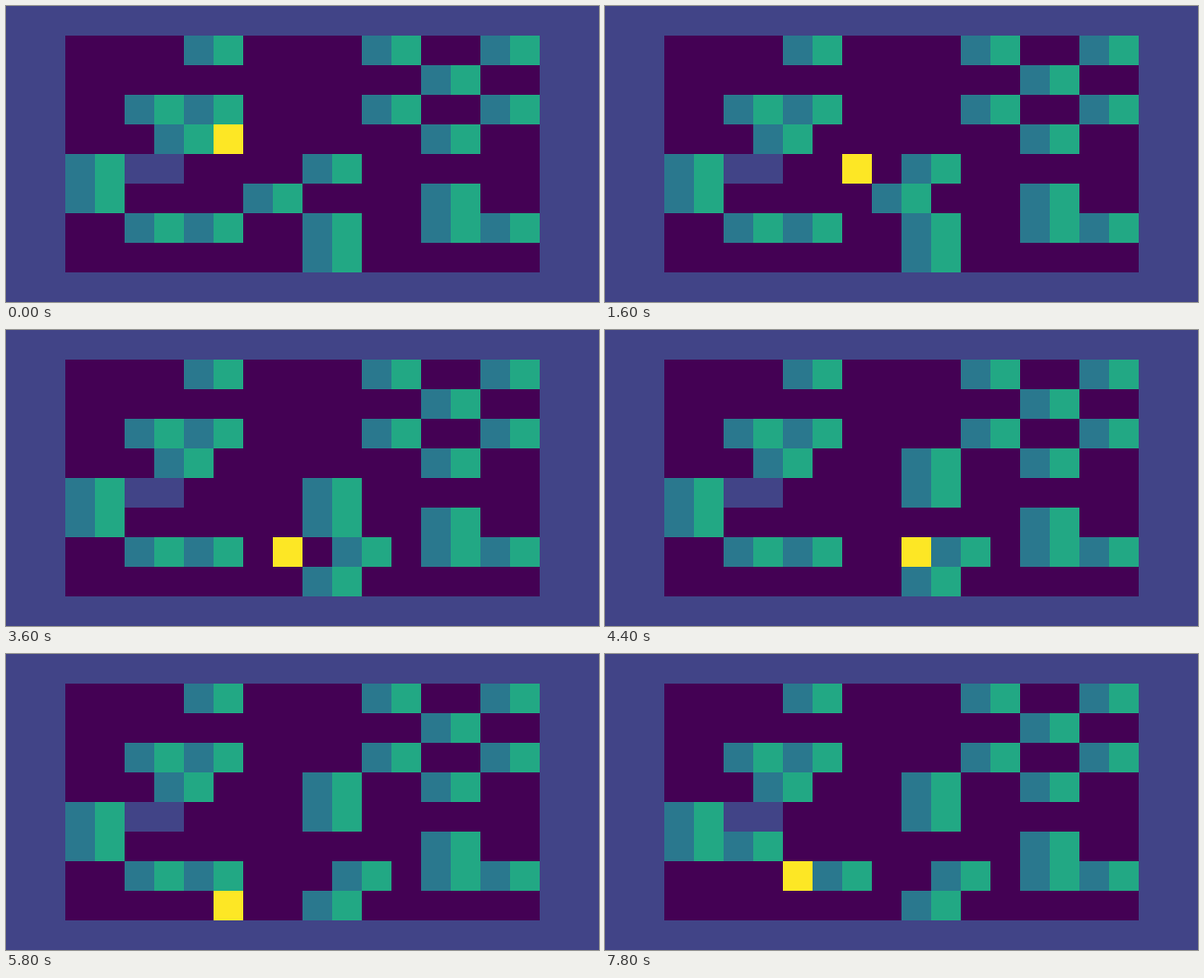
Recreate the animation shown at these times as an HTML page with a canvas. Size 600 px wide and 300 px high, loop 8000 ms.

```html
<!DOCTYPE html>
<html>
<head>
<meta charset="utf-8">
<style>
html, body { margin: 0; width: 600px; height: 300px; overflow: hidden; }
canvas { display: block; }
</style>
</head>
<body>
<canvas width="600" height="300"></canvas>
<script>
const CELL = 30, STEP = 200;
const MOVES = "vv>^<v^>v>^vv^v>v<>v^v<v<^vv<<<^><<><>>";
const DIRS = { "<": [-1, 0], ">": [1, 0], "^": [0, -1], "v": [0, 1] };
const COLORS = { "#": "#414487", ".": "#440154", "[": "#2a788e", "]": "#22a884", "@": "#fde725" };
const MAP = [
  "####################",
  "##....[]....[]..[]##",
  "##............[]..##",
  "##..[][]....[]..[]##",
  "##...[]@......[]..##",
  "##[]##....[]......##",
  "##[]....[]....[]..##",
  "##..[][]..[]..[][]##",
  "##........[]......##",
  "####################"
];

// Collects every cell that moves along with (x, y); false if a wall blocks it.
function collect(grid, x, y, dx, dy, found) {
  const c = grid[y][x], key = x + "," + y;
  if (c === "#") return false;
  if (c === "." || found.has(key)) return true;
  found.set(key, [x, y, c]);
  if (!collect(grid, x + dx, y + dy, dx, dy, found)) return false;
  if (c === "[") return collect(grid, x + 1, y, dx, dy, found);
  if (c === "]") return collect(grid, x - 1, y, dx, dy, found);
  return true;
}

function move(grid, [dx, dy]) {
  const next = grid.map(row => [...row]);
  const y = grid.findIndex(row => row.includes("@"));
  const x = grid[y].indexOf("@");
  const found = new Map();
  if (collect(grid, x, y, dx, dy, found)) {
    for (const [cx, cy] of found.values()) next[cy][cx] = ".";
    for (const [cx, cy, c] of found.values()) next[cy + dy][cx + dx] = c;
  }
  return next;
}

const states = [MAP.map(row => [...row])];
for (const m of MOVES) states.push(move(states[states.length - 1], DIRS[m]));

const ctx = document.querySelector("canvas").getContext("2d");

function draw() {
  const grid = states[Math.floor(performance.now() / STEP) % states.length];
  grid.forEach((row, y) => row.forEach((c, x) => {
    ctx.fillStyle = COLORS[c];
    ctx.fillRect(x * CELL, y * CELL, CELL, CELL);
  }));
  requestAnimationFrame(draw);
}
draw();
</script>
</body>
</html>
```
